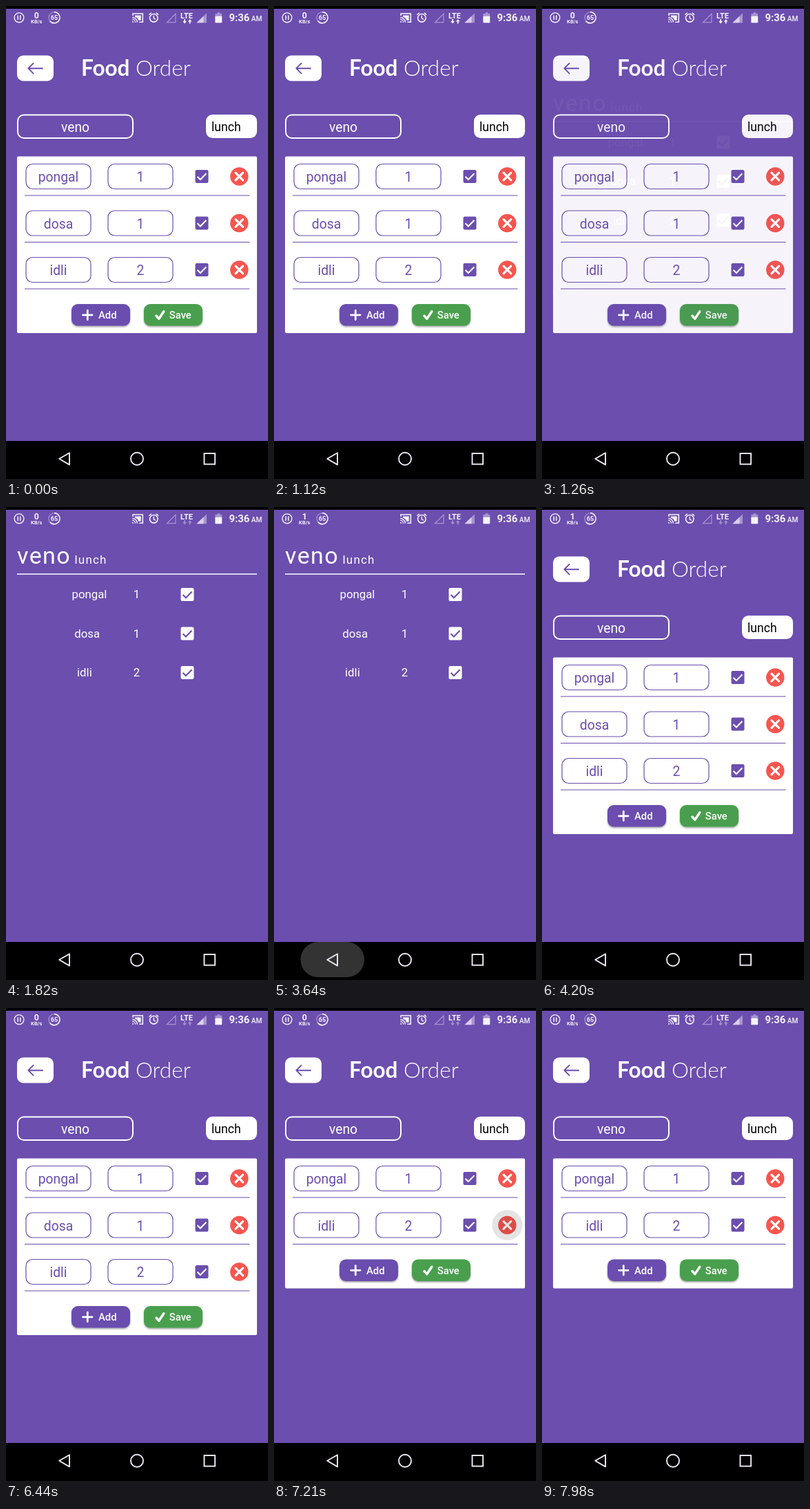
Recreate the animation shown at these times as an HTML page. Size 380 px wide and 684 px high, loop 8000 ms.

```html
<!DOCTYPE html>
<html lang="en">
<head>
<meta charset="utf-8">
<title>Food Order</title>
<style>
  html, body { margin: 0; width: 100%; height: 100%; overflow: hidden; background: #000; }
  svg { display: block; width: 100%; height: 100%; font-family: Roboto, sans-serif; }
  .title { font-family: Lato, "Open Sans", sans-serif; }
</style>
</head>
<body>
<svg viewBox="0 0 380 684" xmlns="http://www.w3.org/2000/svg">
  <defs>
    <clipPath id="screen"><rect y="4" width="380" height="625"/></clipPath>
    <filter id="shadow" x="-10%" y="-10%" width="120%" height="140%">
      <feDropShadow dx="0" dy="1.5" stdDeviation="1.2" flood-opacity=".4"/>
    </filter>
  </defs>
  <rect width="380" height="684"/>
  <g clip-path="url(#screen)">
    <g id="form"></g>
    <g id="list"></g>
  </g>
  <g id="status"></g>
  <g id="nav"></g>
</svg>
<script>
const PURPLE = '#6b4eae', LOOP = 8000, STEP = 70, ROW = 67.5;
const CUSTOMER = 'veno', MEAL = 'lunch';
const dishes = [['pongal', 1], ['dosa', 1], ['idli', 2]];
const $ = id => document.getElementById(id);

const rect = (x, y, w, h, r, fill, extra = '') =>
  `<rect x="${x}" y="${y}" width="${w}" height="${h}" rx="${r}" fill="${fill}" ${extra}/>`;
const line = (d, color, width, extra = '') =>
  `<path d="${d}" fill="none" stroke="${color}" stroke-width="${width}" ${extra}/>`;
const shape = (d, fill, extra = '') => `<path d="${d}" fill="${fill}" ${extra}/>`;
const text = (x, y, size, fill, content, extra = '') =>
  `<text x="${x}" y="${y}" font-size="${size}" fill="${fill}" ${extra}>${content}</text>`;
const MIDDLE = 'text-anchor="middle"', ROUND = 'stroke-linecap="round" stroke-linejoin="round"';

const checkbox = (x, y, fill, mark) =>
  rect(x - 9.5, y - 9.5, 19, 19, 2.2, fill) +
  line(`M${x - 6.5} ${y + .3}l4.4 4.3 8.6 -8.8`, mark, 2.1);

const field = (x, y, value) =>
  rect(x, y, 94, 36, 9.5, 'none', `stroke="${PURPLE}" stroke-width="1.2"`) +
  text(x + 47, y + 25.5, 19.3, PURPLE, value, MIDDLE);

function orderRow([dish, count], i) {
  return `<g id="row${i}">` +
    field(29, 228.5, dish) + field(148, 228.5, count) +
    checkbox(284, 246.5, PURPLE, '#fff') +
    '<circle cx="338.3" cy="246.5" r="13.2" fill="#f8554f"/>' +
    line('M333 241.2l10.6 10.6m0 -10.6l-10.6 10.6', '#fff', 3.2, ROUND) +
    line('M27 274H353.5', PURPLE, 1.2) + '</g>';
}

$('form').innerHTML =
  rect(0, 4, 380, 625, 0, PURPLE) +
  rect(16, 71.5, 53, 37, 9, '#fff') +
  line('M53 90.2H32.5M39.5 83l-7.2 7.2 7.2 7.2', PURPLE, 1.9, ROUND) +
  `<g class="title">${text(109, 100.5, 31.5, '#fff', 'Food', 'font-weight="700"')}` +
  `${text(188, 100.5, 31.5, '#fff', 'Order', 'font-weight="300"')}</g>` +
  rect(17, 157.5, 167, 33.5, 9, 'none', 'stroke="#fff" stroke-width="2"') +
  text(100.5, 181.5, 19.3, '#fff', CUSTOMER, MIDDLE) +
  rect(290, 157, 74, 34, 9.5, '#fff') +
  text(298, 181, 17.6, '#000', MEAL) +
  rect(16, 217.5, 348, 255.5, 2, '#fff', 'id="card"') +
  dishes.map(orderRow).join('') +
  '<circle id="ripple" cx="338.3" cy="314" r="0"/>' +
  '<g id="buttons">' +
  rect(95, 431, 85, 31.5, 9, PURPLE, 'filter="url(#shadow)"') +
  line('M111.5 446.8h13.5m-6.75 -6.75v13.5', '#fff', 2.8, ROUND) +
  text(134, 452, 14.8, '#fff', 'Add', 'font-weight="500"') +
  rect(200, 431, 85, 31.5, 9, '#489f4e', 'filter="url(#shadow)"') +
  line('M218 448l3.8 4.3 7 -10.6', '#fff', 3.4, ROUND) +
  text(236.8, 452, 14.8, '#fff', 'Save', 'font-weight="500"') + '</g>';

$('list').innerHTML =
  rect(0, 4, 380, 625, 0, PURPLE) +
  text(16, 82, 34, '#fff', CUSTOMER, 'letter-spacing="1.4"') +
  text(99.5, 81.5, 17, '#fff', MEAL, 'letter-spacing="1.2"') +
  line('M16 97H364', '#fff', 1.4) +
  dishes.map(([dish, count], i) => {
    const y = 126.6 + i * 56.4;
    return text([95.5, 99.2, 103][i], y + 5.8, 16.8, '#fff', dish) +
      text(189.5, y + 5.8, 16.8, '#fff', count, MIDDLE) + checkbox(263, y, '#fff', PURPLE);
  }).join('');

const WHITE = '#f6f2fb', DIM = '#a794d0', BOLD = 'font-weight="700"';
$('status').innerHTML =
  `<circle cx="19" cy="16.8" r="6.9" fill="none" stroke="${WHITE}" stroke-width="1.4"/>` +
  line('M17.2 13.6v6.4m3.6 -6.4v6.4', WHITE, 1.5) +
  text(44.3, 18, 12.3, WHITE, 0, `id="speed" ${MIDDLE} ${BOLD}`) +
  text(44.3, 25.3, 7.6, WHITE, 'KB/s', `${MIDDLE} ${BOLD}`) +
  `<circle cx="70" cy="16.8" r="8" fill="none" stroke="${DIM}" stroke-width="1.3"/>` +
  line('M70 8.8a8 8 0 1 1 -6.5 12.7', WHITE, 1.5) +
  text(70, 20.3, 9.3, WHITE, 65, `${MIDDLE} ${BOLD}`) +
  line('M184 14v-3h14.3v12.3h-5', WHITE, 1.6) +
  shape('M187 13.5h8.7v7.3h-3.5q-1.3 -4.3 -5.2 -5z', WHITE) +
  line('M183.2 16.5a7.3 7.3 0 0 1 7.3 7.3M183.2 19.4a4.4 4.4 0 0 1 4.4 4.4', WHITE, 1.4) +
  shape('M183.2 21.8a2 2 0 0 1 2 2h-2z', WHITE) +
  `<circle cx="214.3" cy="17.3" r="5.8" fill="none" stroke="${WHITE}" stroke-width="1.6"/>` +
  line('M214.3 13.8v3.8l2.6 1.8M207.4 12.8l3.4 -2.9m10.4 2.9l-3.4 -2.9', WHITE, 1.4) +
  line('M246 11.3v12.4h-12.6z', DIM, 1.2) +
  text(262, 17.6, 11, WHITE, 'LTE', `${MIDDLE} ${BOLD}`) +
  shape('M258.2 19h1.8v3h2l-2.9 3.4 -2.9 -3.4h2zM265.8 25.4h1.8v-3h2l-2.9 -3.4 -2.9 3.4h2z', WHITE, 'id="arrows"') +
  shape('M291 10.3v14h-14.5z', DIM) + shape('M286.5 14.7v9.6h-10z', '#d9cfec') +
  shape('M306.5 9.3h4v1.6h2.7v13.4h-9.8v-13.4h3.1z', DIM) +
  rect(303.4, 14.8, 9.8, 9.5, .8, WHITE) +
  text(323.5, 22.3, 14.9, WHITE, '9:36', BOLD) +
  text(355.8, 22.3, 10.2, WHITE, 'AM', 'font-weight="500"');

$('nav').innerHTML =
  rect(38.5, 629, 92.5, 51, 25.5, '#333', 'id="pill"') +
  line('M77.2 654.8L92 646.2v17.2z', '#efeaf6', 1.9, 'stroke-linejoin="round"') +
  '<circle cx="190" cy="654.8" r="9" fill="none" stroke="#efeaf6" stroke-width="1.9"/>' +
  rect(287.5, 647, 15.6, 15.6, 0, 'none', 'stroke="#efeaf6" stroke-width="1.9"');

const progress = (t, start, length) => Math.min(1, Math.max(0, (t - start) / length));
const easeOut = p => 1 - (1 - p) ** 3;
const show = (id, visible) => $(id).setAttribute('visibility', visible ? 'visible' : 'hidden');
const shiftY = (id, y) => $(id).setAttribute('transform', `translate(0 ${y})`);

function draw(t) {
  // The list page fades in while rising, and leaves the same way backwards.
  const page = t < 3000 ? progress(t, 1190, 300) : 1 - progress(t, 3710, 300);
  show('list', page > 0);
  $('list').setAttribute('opacity', page ** 2);
  shiftY('list', 625 * .25 * (1 - easeOut(page)));

  $('pill').setAttribute('opacity', t < 3640 ? 0 : 1 - progress(t, 3780, 350));

  // Deleting the second dish pulls everything below up by one row.
  const removed = t >= 7140;
  show('row1', !removed);
  shiftY('row2', removed ? ROW : 2 * ROW);
  shiftY('buttons', removed ? -ROW : 0);
  $('card').setAttribute('height', removed ? 255.5 - ROW : 255.5);

  $('ripple').setAttribute('r', 22 * easeOut(progress(t, 6930, 300)));
  $('ripple').setAttribute('opacity', .13 * (1 - progress(t, 7140, 350)));

  $('speed').textContent = t >= 2870 && t < 4830 ? 1 : 0;
  $('arrows').setAttribute('opacity', t < 1820 ? 1 : .4);
}

shiftY('row1', ROW);
function tick() {
  const t = performance.now() % LOOP;
  draw(Math.floor(t / STEP) * STEP);
  requestAnimationFrame(tick);
}
tick();
</script>
</body>
</html>
```
